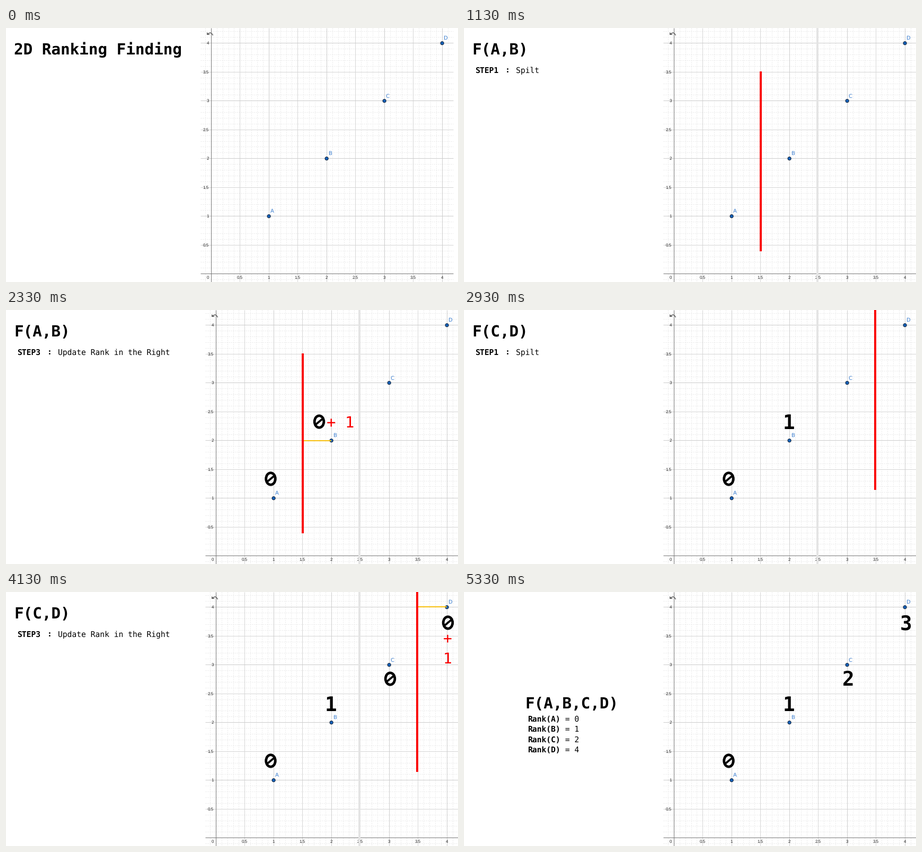
Recreate the animation shown at these times as a matplotlib script. Size 853x480 px, loop 5.93 s.

```python
import matplotlib.pyplot as plt
from matplotlib.animation import FuncAnimation
from matplotlib.collections import LineCollection
from matplotlib.patches import Ellipse, PathPatch, Polygon
from matplotlib.path import Path
from matplotlib.transforms import Affine2D

W, H, DPI = 853, 480, 64
PT = 72 / DPI                      # points per pixel
STEP_MS, LOOP_MS = 10, 5930
FIRST_MS, SLIDE_MS = 530, 600

LEFT, OX, OY, UNIT = 376, 395.9, 464.2, 109
RED, YELLOW, INK = "#fa0000", "#f8c010", "#000000"
MONO = "DejaVu Sans Mono"

plt.rcParams["text.hinting"] = "none"
fig = plt.figure(figsize=(W / DPI, H / DPI), dpi=DPI, facecolor="white")
ax = fig.add_axes([0, 0, 1, 1])
ax.set_xlim(0, W)
ax.set_ylim(H, 0)
ax.axis("off")

shift = Affine2D()
plot_tf = shift + ax.transData


def px(u, v):
    return OX + UNIT * u, OY - UNIT * v


def text(x, y, s, size, color=INK, bold=False, font=MONO, ha="left",
         va="baseline", **kw):
    return ax.text(x, y, s, fontsize=size * PT, color=color, family=font,
                   weight="bold" if bold else "normal", ha=ha, va=va,
                   zorder=5, **kw)


def segments(segs, color, width=1, style="solid", z=1, **kw):
    lines = LineCollection(segs, colors=color, linewidths=width * PT,
                           linestyles=[style], zorder=z, **kw)
    return ax.add_collection(lines, autolim=False)


def vline(x, top=0, bottom=H, color=RED, width=4):
    return segments([[(x, top), (x, bottom)]], color, width, z=8)


def link(x0, x1, y):
    return segments([[(x0, y), (x1, y)]], YELLOW, 2, z=7)


# ---- coordinate plane ----
def grid(ticks_x, ticks_y, color, style="solid"):
    segs = []
    for u in ticks_x:
        x = px(u, 0)[0]
        segs.append([(x, 0), (x, H)])
    for v in ticks_y:
        y = px(0, v)[1]
        segs.append([(LEFT, y), (W, y)])
    segments(segs, color, style=style, transform=plot_tf)


def plane():
    fine_x = [i / 10 for i in range(-1, 42) if i % 5]
    fine_y = [i / 10 for i in range(-1, 43) if i % 5]
    halves = [i + 0.5 for i in range(4)]
    units = range(1, 5)
    grid(fine_x, fine_y, "#e8e8e8", (0, (2, 2)))
    grid(halves, halves, "#d6d6d6")
    grid(units, units, "#cccccc")
    grid([0], [0], "#777777")

    tick = dict(size=8, color="#222222", font="Liberation Sans",
                transform=plot_tf)
    for i in range(9):
        label = f"{i / 2:g}"
        x, y = px(i / 2, i / 2)
        if i:
            text(x, 474, label, ha="center", **tick)
            text(OX - 4, y + 3, label, ha="right", **tick)
        else:
            text(OX - 4, 474, label, ha="right", **tick)

    for i, name in enumerate("ABCD", 1):
        x, y = px(i, i)
        x, y = x + 0.2, y + 0.5
        ax.add_patch(Ellipse((x, y), 6.2, 6.2, fc="#1560b8", ec="#12233a",
                             lw=PT, zorder=6, transform=plot_tf))
        text(x + 6, y - 6.3, name, 10, "#3f80d0", font="DejaVu Sans",
             ha="center", transform=plot_tf)


def undo_icon():
    gray = "#6a6a6a"
    head = [(388.5, 7.5), (388.5, 13), (394, 13)]
    ax.add_patch(Polygon(head, fc=gray, lw=0, zorder=4, transform=plot_tf))
    arc = Path([(390.5, 11), (396, 6), (399.5, 14)],
               [Path.MOVETO, Path.CURVE3, Path.CURVE3])
    ax.add_patch(PathPatch(arc, fc="none", ec=gray, lw=1.6 * PT, zorder=4,
                           transform=plot_tf))


# ---- slide parts, each returning a list of artists ----
def title(s, x=15.5, y=50):
    return [text(x, y, s, 29.2, bold=True)]


def step(n, dy=0):
    what = ("Spilt", "Find Rank of Right and Left",
            "Update Rank in the Right")[n - 1]
    y = 85 + dy
    return [text(21, y, f"STEP{n}", 14.6, bold=True),
            text(82, y - 1, ":", 14.6, bold=True, ha="center"),
            text(98.5, y, what, 14.6)]


def rank(n, x, y):
    """Big bold digit centred on (x, y); zero carries a slash."""
    if n:
        return [text(x, y + 13, str(n), 37.5, bold=True, ha="center")]
    ring = Ellipse((x, y), 17.6, 22.4, fc="none", ec=INK, lw=4.8 * PT,
                   zorder=5)
    ax.add_patch(ring)
    slash = segments([[(x - 6, y + 5), (x + 6, y - 5)]], INK, 3.8, z=5)
    return [ring, slash]


def plus_below(n, x, y):
    return [text(x, y + 10, "+", 28, RED, ha="center"),
            text(x, y + 48, str(n), 28, RED, ha="center")]


def summary():
    parts = title("F(A,B,C,D)", 115.5, 220)
    for i, (name, value) in enumerate(zip("ABCD", (0, 1, 2, 4))):
        y = 245 + 19.3 * i
        parts += [text(120.5, y, f"Rank({name})", 14.6, bold=True),
                  text(182, y, f" = {value}", 14.6)]
    return parts


def band():
    return [vline(667, color="#e4e4e4")]


AT = {"A": (499.5, 319), "B": (612.5, 212), "C": (725, 164), "D": (834, 58)}


def ranks(**values):
    return [a for k, n in values.items() for a in rank(n, *AT[k])]


def left_half(n):
    return title("F(A,B)") + step(n) + band() + [vline(560, 82, 422)]


def right_half(n):
    return (title("F(C,D)") + step(n) + band() + [vline(776, 0, 340)]
            + ranks(A=0, B=1))


plane()
undo_icon()

slides = [
    title("2D Ranking Finding"),
    title("F(A,B,C,D)") + step(1) + [vline(668)],
    left_half(1),
    left_half(2) + ranks(A=0, B=0),
    left_half(3) + ranks(A=0) + rank(0, 591, 211)
    + [text(605.5, 222, "+ 1", 29, RED), link(560, 614, 247)],
    right_half(1),
    right_half(2) + ranks(C=0, D=0),
    right_half(3) + ranks(C=0, D=0) + plus_below(1, 833.5, 87)
    + [link(776, 832, 28)],
    title("F(A,B,C,D)") + step(3, -7) + [vline(667)]
    + ranks(A=0, B=1, C=0, D=1)
    + plus_below(2, 725, 201) + plus_below(2, 833.5, 87)
    + [link(667, 723, 139), link(667, 832, 28)],
    summary() + ranks(A=0, B=1, C=2, D=3),
]
offsets = {0: (-9, 0), 1: (0, 6)}


def update(frame):
    t = frame * STEP_MS
    now = 0 if t < FIRST_MS else 1 + (t - FIRST_MS) // SLIDE_MS
    for i, parts in enumerate(slides):
        for artist in parts:
            artist.set_visible(i == now)
    shift.clear().translate(*offsets.get(now, (0, 0)))
    return []


anim = FuncAnimation(fig, update, frames=LOOP_MS // STEP_MS,
                     init_func=lambda: update(0), interval=STEP_MS,
                     repeat=True, repeat_delay=0, blit=False)
plt.show()
```
